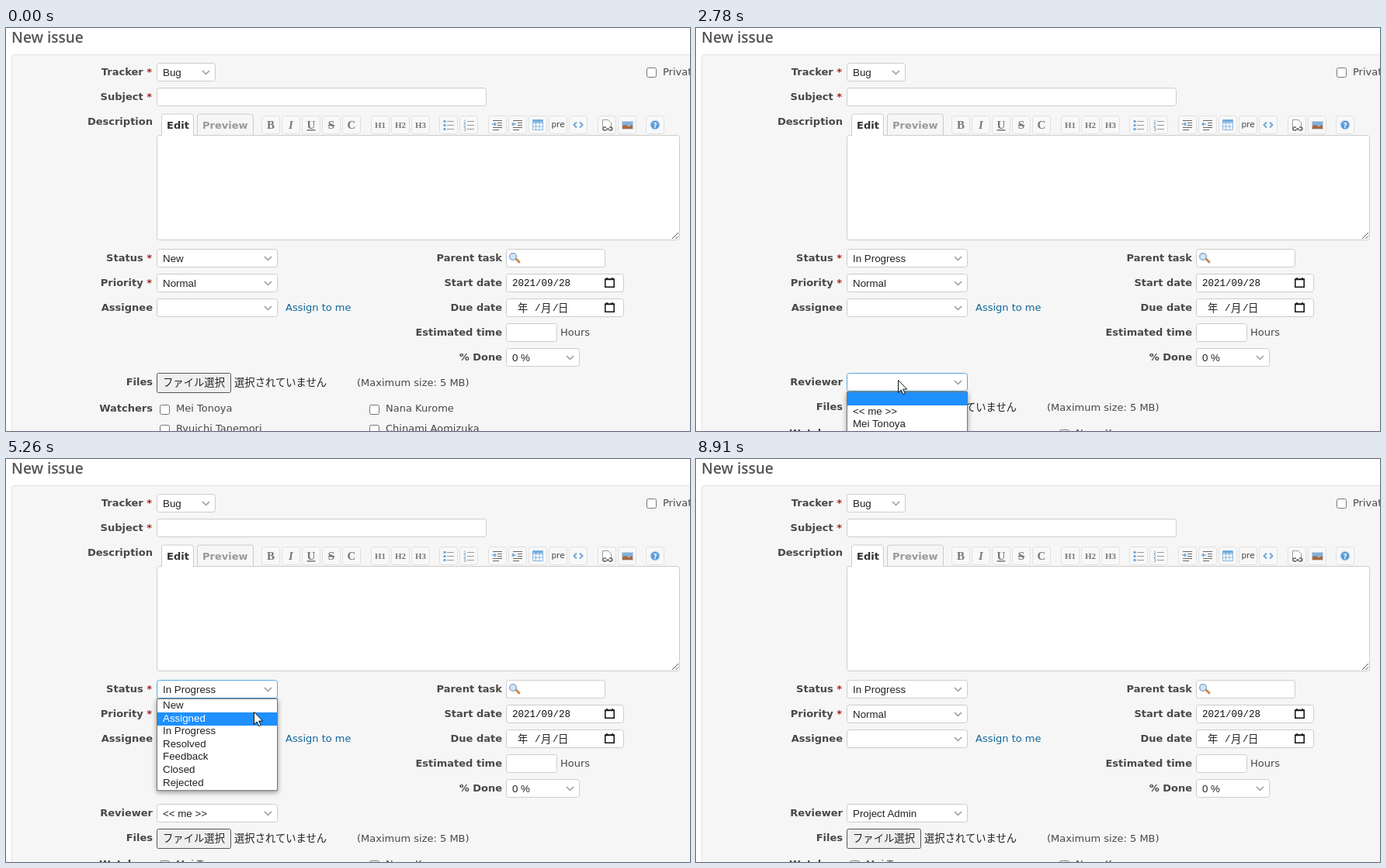
Recreate the animation shown at these times as an HTML page. Size 881 by 520 pixels, loop 9450 ms.

```html
<!DOCTYPE html>
<html lang="en">
<head>
<meta charset="utf-8">
<title>New issue</title>
<style>
html, body { margin: 0; width: 100%; height: 100%; overflow: hidden; background: #fff; }
svg { display: block; }
text { font: 13px "DejaVu Sans", sans-serif; fill: #484848; white-space: pre; }
.label { font-weight: bold; text-anchor: end; }
.tab { font-weight: bold; }
.required { fill: #b0201c; }
.title { font: 600 19px "Open Sans", sans-serif; fill: #555; }
.ui { font: 13.33px "Liberation Sans", Arial, sans-serif; fill: #222; }
.cjk { font: 13.33px "Noto Sans CJK JP", "Noto Sans CJK", sans-serif; fill: #222; }
.date { font: 12.5px "Liberation Mono", monospace; fill: #111; }
.serif { font: bold 15px "Liberation Serif", serif; fill: #777; text-anchor: middle; }
.heading { font-size: 11px; }
.field { fill: #fff; stroke: #ccc; }
.focus { stroke: #5ad; }
.tool { fill: #f8f8f8; stroke: #e0e0e0; }
.line { fill: none; stroke: #999; }
.blue { fill: none; stroke: #6fa8dc; }
.menu { filter: drop-shadow(0 2px 3px rgba(0, 0, 0, .4)); }
.active { fill: #fff; }
</style>
</head>
<body>
<svg id="stage" width="881" height="520" viewBox="0 0 881 520"></svg>
<script>
const LOOP = 9450, ROW = 16.6;
const STATUSES = ['New', 'Assigned', 'In Progress', 'Resolved', 'Feedback', 'Closed', 'Rejected'];
const REVIEWERS = ['', '<< me >>', 'Mei Tonoya'];

const escapeText = s => s.replace(/</g, '&lt;').replace(/>/g, '&gt;');
const text = (x, y, s, cls = '', attrs = '') =>
  `<text x="${x}" y="${y}" class="${cls}" ${attrs}>${escapeText(s)}</text>`;
const box = (x, y, w, h, cls = 'field', r = 3, attrs = '') =>
  `<rect x="${x + .5}" y="${y + .5}" width="${w - 1}" height="${h - 1}" rx="${r}" class="${cls}" ${attrs}/>`;
const path = (d, cls = 'line', attrs = '') => `<path d="${d}" class="${cls}" ${attrs}/>`;
const at = (x, y, body, attrs = '') => `<g transform="translate(${x} ${y})" ${attrs}>${body}</g>`;

const label = (x, y, s, required) =>
  `<text x="${x}" y="${y}" class="label">${s}${required ? '<tspan class="required"> *</tspan>' : ''}</text>`;
const select = (x, y, w, value, id = '') =>
  box(x, y, w, 24, 'field', 3, id && `id="${id}Box"`) +
  text(x + 8, y + 17, value, 'ui', id && `id="${id}Text"`) +
  path(`M${x + w - 17} ${y + 10}l4.5 4.5 4.5-4.5`, 'line', 'stroke-width="1.5"');
const checkbox = (x, y) => box(x, y, 13, 13, 'field', 2, 'style="stroke:#767676"');
const watcher = (x, y, name) => checkbox(x, y) + text(x + 21, y + 9, name);
const calendar = (x, y) => at(x, y,
  path('M.8 2h11.4v10.2H.8zM0 2.5h13M3 0v2M10 0v2', '', 'fill="none" stroke="#111" stroke-width="1.5"'));
const menu = (id, y, items) => `<g id="${id}">` +
  `<g class="menu">${box(194, y, 156, items.length * ROW + 3, 'field', 0, 'style="stroke:#777"')}</g>` +
  `<rect x="195" width="154" height="17" fill="#1e90ff"/>` +
  items.map((s, i) => text(202, y + 13 + i * ROW, s, 'ui')).join('') + '</g>';

const listLines = 'M-2-4.5h9M-2 .5h9M-2 5.5h9';
const indentLines = 'M-6-5.5h12M0-2.5h6M0 .5h6M-6 3.5h12M-6 6.5h8';
const letter = (s, extra) => text(0, 5, s, 'serif', extra);
const heading = s => text(0, 4, s, 'serif heading');
const icons = [
  [329, letter('B')],
  [355, letter('I', 'font-style="italic" style="font-style:italic"')],
  [381, letter('U', 'text-decoration="underline"')],
  [407, letter('S', 'text-decoration="line-through"')],
  [433, letter('C')],
  [470, heading('H1')], [496, heading('H2')], [522, heading('H3')],
  [558, path(listLines) + path('M-6.5-4.5h3M-6.5 .5h3M-6.5 5.5h3', 'blue', 'stroke-width="3"')],
  [584, path(listLines) + [1, 2, 3].map(n =>
    text(-7, n * 5 - 7, String(n), '', 'style="font-size:6px;fill:#4d88bd"')).join('')],
  [621, path(indentLines, 'line', 'style="stroke:#666"') + path('M-7-1h5m-2-2 2 2-2 2', 'blue', 'stroke-width="1.5"')],
  [647, path(indentLines, 'line', 'style="stroke:#666"') + path('M-2-1h-5m2-2-2 2 2 2', 'blue', 'stroke-width="1.5"')],
  [673, `<rect x="-6.5" y="-6.5" width="13" height="13" fill="#fff"/>` +
    path('M-6-5h12', 'blue', 'stroke-width="3"') +
    path('M-6.5-6.5h13v13h-13zM-6.5-2.5h13M-6.5 2h13M-2.5-6v12M2-6v12', 'blue', 'opacity=".8"')],
  [699, text(0, 3, 'pre', '', 'text-anchor="middle" style="font-size:10.5px;fill:#444"')],
  [725, path('M-2-3.5-5.5 0-2 3.5M2-3.5 5.5 0 2 3.5', 'blue', 'stroke-width="2"')],
  [762, path('M-5.5 6.5v-13h7l4 4v9z', 'line', 'style="fill:#fff"') +
    path('M-1 3h-2a2 2 0 0 0 0 4h2M3 3h2a2 2 0 0 1 0 4h-2M-1 5h4', 'line', 'style="stroke:#666" stroke-width="1.3"')],
  [788, '<rect x="-7" y="-5" width="15" height="11" fill="#c9d3dc"/>' +
    '<rect x="-6" y="-4" width="13" height="5" fill="#7fb0de"/>' +
    '<path d="M-6 5V1l4-1 4 2 5-2v5z" fill="#a9673f"/>'],
  [824, '<circle r="6.5" fill="#c3daf0"/><circle r="5.3" fill="#5b9bd5"/>' +
    text(0, 3.5, '?', 'tab', 'text-anchor="middle" style="font-size:9px;fill:#fff"')],
];

const header =
  text(7, 19, 'New issue', 'title') +
  box(7, 34, 900, 520, '', 3, 'fill="#f6f6f6" stroke="#e2e2e2"') +
  label(188, 61, 'Tracker', true) + select(194, 45, 76, 'Bug') +
  checkbox(825, 51) + text(846, 61, 'Private') +
  label(188, 93, 'Subject', true) + box(194, 77, 425, 24) +
  label(189, 125, 'Description') +
  path('M246.5 138v-24q0-3 3-3h66q3 0 3 3v24', '', 'fill="#f6f6f6" stroke="#ccc"') +
  text(253, 130, 'Preview', 'tab', 'style="fill:#999"') +
  icons.map(([x, icon]) => box(x, 113, 24, 24, 'tool') + at(x + 12, 125, icon)).join('') +
  box(194, 138, 674, 136) +
  path('M200.5 139v-25q0-3 3-3h35q3 0 3 3v25', '', 'fill="#fff" stroke="#ccc"') +
  text(207, 130, 'Edit', 'tab', 'style="fill:#333"') +
  path('M858 272l8-8M862.5 272l3.5-3.5', 'line', 'style="stroke:#555"');

const attributes =
  label(188, 301, 'Status', true) + select(194, 285, 156, 'New', 'status') +
  label(188, 333, 'Priority', true) + select(194, 317, 156, 'Normal') +
  label(189, 365, 'Assignee') + select(194, 349, 156, '') +
  text(360, 365, 'Assign to me', '', 'style="fill:#169"') +
  label(639, 301, 'Parent task') + box(644, 285, 128, 24) +
  path('M657 298l4 4', '', 'stroke="#c98a4b" stroke-width="3" stroke-linecap="round"') +
  '<circle cx="653" cy="295" r="4.3" fill="#cfe6fa" stroke="#7f9fc0" stroke-width="1.3"/>' +
  label(639, 333, 'Start date') + box(644, 317, 152, 24) +
  text(652, 333, '2021/09/28', 'date') + calendar(771, 322) +
  label(639, 365, 'Due date') + box(644, 349, 152, 24) +
  text(659, 366, '年', 'cjk') + text(681, 365, '/', 'date') + text(689, 366, '月', 'cjk') +
  text(704, 365, '/', 'date') + text(711, 366, '日', 'cjk') + calendar(771, 354) +
  label(639, 397, 'Estimated time') + box(644, 381, 66, 24) + text(714, 397, 'Hours') +
  label(639, 429, '% Done') + select(644, 413, 95, '0 %');

const reviewer = `<g id="reviewer">${label(189, 461, 'Reviewer')}${select(194, 445, 156, '', 'reviewer')}</g>`;

const footer = '<g id="footer">' +
  label(189, 461, 'Files') +
  box(194, 445, 96, 26, '', 2, 'id="fileButton" stroke="#555"') +
  text(202, 462, 'ファイル選択', 'cjk') + text(294, 462, '選択されていません', 'cjk') +
  text(452, 462, '(Maximum size: 5 MB)') +
  label(189, 495, 'Watchers') +
  watcher(198, 486, 'Mei Tonoya') + watcher(468, 486, 'Nana Kurome') +
  watcher(198, 512, 'Ryuichi Tanemori') + watcher(468, 512, 'Chinami Aomizuka') + '</g>';

const $ = id => document.getElementById(id);
$('stage').innerHTML = header + attributes + reviewer + footer +
  menu('statusMenu', 309, STATUSES) + menu('reviewerMenu', 469, REVIEWERS) +
  '<path id="cursor" d="M.5.5v16l3.7-3.4 2.6 5.6 2.4-1.1-2.5-5.5h5z" fill="#fff" stroke="#111"/>';

// Pointer moves: first step, last step, number of steps, destination, linear
const moves = [
  [210, 590, 6, 328, 293],
  [1220, 1370, 3, 299, 343],
  [1450, 1600, 3, 296, 353],
  [2320, 2700, 6, 260, 454],
  [2930, 3310, 6, 233, 493],
  [3940, 4550, 9, 346, 298],
  [4860, 5260, 6, 319, 326],
  [6190, 6430, 4, 328, 305],
  [6730, 7120, 6, 295, 350],
  [8510, 8830, 5, 735, 500, true],
];

function pointerAt(t) {
  let x = 844, y = 525;
  for (const [start, end, steps, toX, toY, linear] of moves) {
    if (t < start) break;
    const step = Math.floor((t - start) / (end - start) * (steps - 1) + .07) + 1;
    const p = Math.min(step / steps, 1);
    const eased = linear ? p : p * (2 - p);
    x += (toX - x) * eased;
    y += (toY - y) * eased;
  }
  return [Math.round(x), Math.round(y)];
}

const during = (t, ...spans) => spans.some(([from, to]) => t >= from && t < to);
const show = (id, on) => $(id).style.display = on ? '' : 'none';

function updateMenu(id, top, open, pointerY, selected) {
  show(id, open);
  const row = pointerY >= top ? Math.floor((pointerY - top) / ROW) : selected;
  $(id).querySelector('rect[fill]').setAttribute('y', Math.round(top + 1 + row * ROW));
  $(id).querySelectorAll('text').forEach((item, i) => item.classList.toggle('active', i === row));
}

function draw(t) {
  const [x, y] = pointerAt(t);
  const status = t < 1920 ? 0 : t < 5730 ? 2 : t < 7900 ? 1 : 2;
  const hasReviewer = during(t, [2000, 5870], [7970, LOOP]);
  const shift = hasReviewer ? 32 : 0;

  $('statusText').textContent = STATUSES[status];
  $('reviewerText').textContent = t < 3790 ? '' : t < 5730 ? '<< me >>' : 'Project Admin';
  $('statusBox').classList.toggle('focus', during(t, [910, 2000], [4630, 5870], [6650, 7970]));
  $('reviewerBox').classList.toggle('focus', during(t, [2780, 4630]));
  show('reviewer', hasReviewer);
  $('footer').setAttribute('transform', `translate(0 ${shift})`);

  const reviewerOpen = during(t, [2780, 3790]);
  const overButton = !reviewerOpen && x >= 194 && x < 290 && y >= 445 + shift && y < 471 + shift;
  $('fileButton').setAttribute('fill', overButton ? '#e2e2e2' : '#efefef');

  updateMenu('statusMenu', 309, during(t, [910, 1920], [4630, 5730], [6650, 7900]), y, status);
  updateMenu('reviewerMenu', 469, reviewerOpen, y, 0);
  show('cursor', during(t, [210, 8910]));
  $('cursor').setAttribute('transform', `translate(${x} ${y})`);
}

function tick() {
  draw(performance.now() % LOOP);
  requestAnimationFrame(tick);
}
tick();
</script>
</body>
</html>
```
